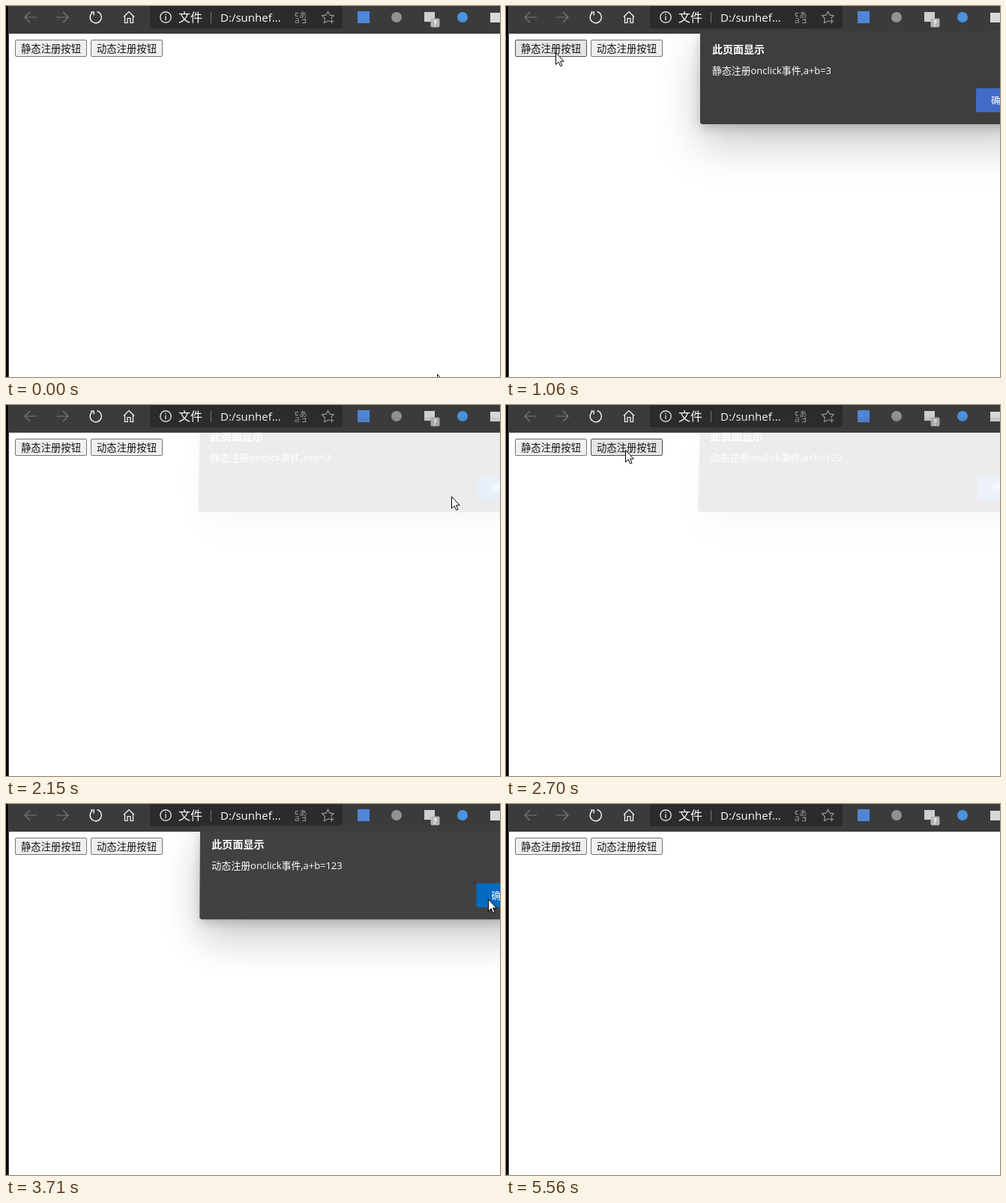
An HTML page for the animation above (5.72 s loop, 659 px wide and 496 px high).

```html
<!DOCTYPE html>
<html lang="zh">
<head>
<meta charset="utf-8">
<title>onclick</title>
<style>
  html, body { margin: 0; width: 100%; height: 100%; overflow: hidden; background: #fff; }
  svg { display: block; width: 659px; height: 496px; }
  text { font-family: "Open Sans", "Noto Sans CJK SC", "Noto Sans CJK", sans-serif; white-space: pre; }
  .line { fill: none; stroke-width: 1.2; }
  .page text { font-size: 13.333px; fill: #111; }
</style>
</head>
<body>
<svg viewBox="0 0 659 496">
  <defs>
    <filter id="wide" filterUnits="userSpaceOnUse" x="150" y="-80" width="670" height="400"><feGaussianBlur stdDeviation="28"/></filter>
    <filter id="tight" filterUnits="userSpaceOnUse" x="150" y="-80" width="670" height="400"><feGaussianBlur stdDeviation="7"/></filter>
    <clipPath id="below"><rect x="4" y="37" width="655" height="459"/></clipPath>
  </defs>

  <rect width="659" height="496" fill="#fff"/>
  <rect width="659" height="37" fill="#3b3b3b"/>
  <path d="M192 0H449V26a4 4 0 0 1-4 4H196a4 4 0 0 1-4-4Z" fill="#2b2b2b"/>

  <!-- navigation -->
  <g class="line" stroke="#7b7b7b">
    <path d="M41 15H25M32 8L25 15L32 22"/>
    <path d="M67 15H83M76 8L83 15L76 22"/>
  </g>
  <g class="line" stroke="#fff">
    <path d="M115 9.2A7.6 7.6 0 1 0 121.5 7.7M113 8.2H117.2V12.4" stroke-width="1.3"/>
    <path d="M157 14.5L164 7.5L171 14.5M158.500 13.500V22.500H162V16.500H166V22.500H169.500V13.500"/>
    <circle cx="213" cy="15" r="7.2"/>
    <path d="M213 13.500V19M213 10.500V12"/>
  </g>
  <text x="230" y="21" font-size="16" fill="#fff">文件</text>
  <path d="M273.500 8V23" stroke="#777"/>
  <text x="286" y="21" font-size="15" fill="#fff">D:/sunhef...</text>

  <!-- address bar tools -->
  <g fill="#969696">
    <text x="391" y="15.500" font-size="10.500">あ</text>
    <text x="385" y="23" font-size="12">a</text>
    <path class="line" d="M390 9.500H386.500V14M386 13.500H390M395 22.500H399.500V17M395 18.500H399" stroke="#969696"/>
  </g>
  <path class="line" d="M431 19.500L424.500 22.500L425.500 16.800L421.500 12.800L427 12.200L429.500 7.500L432 12.200L437 12.800L433.500 16.500M431 20.500H437.500M434.500 17.500V23.500" stroke="#999"/>

  <!-- extensions -->
  <rect x="469" y="7" width="16" height="16" fill="#4f86d8"/>
  <circle cx="521" cy="15" r="7" fill="#929292"/>
  <rect x="558" y="8" width="14" height="13" fill="#cfcfcf"/>
  <rect x="566.500" y="16.500" width="12" height="12" rx="2" fill="#b4b4b4"/>
  <text x="572.500" y="26.500" font-size="10" font-weight="700" fill="#fff" text-anchor="middle">?</text>
  <circle cx="609" cy="15" r="7" fill="#4b92df"/>
  <rect x="646" y="9" width="13" height="13" fill="#d8d8d8"/>

  <g class="page">
    <rect id="btnA" x="12.500" y="45.500" width="95" height="22" rx="1.500"/>
    <text x="20" y="62">静态注册按钮</text>
    <rect id="btnB" x="113.500" y="45.500" width="95" height="22" rx="1.500"/>
    <text x="121" y="62">动态注册按钮</text>
  </g>

  <g id="dialog">
    <g clip-path="url(#below)">
      <g id="shadow">
        <rect x="259" y="58" width="448" height="125" fill-opacity=".22" filter="url(#wide)"/>
        <rect x="259" y="38" width="448" height="125" fill-opacity=".18" filter="url(#tight)"/>
      </g>
    </g>
    <g id="panel">
      <path id="sheet" fill="#3e3e3e"/>
      <text x="275" y="63" font-size="14" font-weight="700" fill="#fff">此页面显示</text>
      <text id="message" x="275" y="91" font-size="12.900" fill="#fff"></text>
      <rect id="ok" x="627" y="110" width="64" height="32" rx="2"/>
      <text x="647" y="130.500" font-size="12.500" font-weight="500" fill="#fff">确定</text>
    </g>
  </g>

  <rect width="3" height="496" fill="#000"/>
  <rect x="3" width="1" height="496" fill="#4a4a4a"/>

  <path id="cursor" d="M.5 .5V16.300L4.200 12.900L6.700 18.500L9 17.500L6.600 12H11.300Z" fill="#fff" stroke="#000"/>
</svg>
<script>
const LOOP = 5720, TICK = 75;
const el = id => document.getElementById(id);
const set = (id, attrs) => { for (const k in attrs) el(id).setAttribute(k, attrs[k]); };
const within = (t, a, b) => t >= a && t < b;
const ticks = (t, start) => Math.floor((t - start) / TICK);
const ease = p => p * p * (3 - 2 * p);

const START = [575, 492];
const moves = [
  { at: 70, n: 5, to: [66, 62] },
  { at: 1140, n: 7, to: [645, 129] },
  { at: 2150, n: 5, to: [159, 60] },
  { at: 2775, n: 4, to: [645, 129] },
  { at: 3230, n: 2, to: [643, 127] },
  { at: 3790, n: 6, to: [577, 505] }
];

const alerts = [
  { open: 910, hover: 1590, press: 1830, close: 1990, text: '静态注册onclick事件,a+b=3' },
  { open: 2700, hover: 3000, press: 3540, close: 3710, text: '动态注册onclick事件,a+b=123' }
];

// Opacity and vertical shift for each tick of a transition.
const OPENING = [[.09, -16], [.6, -6], [1, 0]];
const CLOSING = [[.98, -4], [.5, -10], [.09, -16]];

function pointer(t) {
  let pos = START;
  for (const { at, n, to } of moves) {
    if (t < at) break;
    const p = ease(Math.min(1, (ticks(t, at) + 1) / n));
    pos = pos.map((v, i) => v + (to[i] - v) * p);
  }
  return pos.map(Math.round);
}

function dialogState(t, { open, close }) {
  if (t < open) return null;
  if (t < close) return OPENING[Math.min(2, ticks(t, open))];
  return CLOSING[ticks(t, close)] || null;
}

function drawButton(id, hover, press) {
  set(id, {
    fill: press ? '#f5f5f5' : hover ? '#e5e5e5' : '#efefef',
    stroke: press ? '#8d8d8d' : hover ? '#4f4f4f' : '#767676'
  });
}

// The dialog grows a little and tilts its top edge away as it lifts.
function drawDialog(t) {
  const box = alerts.find(a => dialogState(t, a));
  el('dialog').style.display = box ? '' : 'none';
  if (!box) return;
  const [opacity, dy] = dialogState(t, box);
  const tilt = -dy * 3 / 16;
  const grow = 1 - dy * .0008;
  set('dialog', { opacity });
  set('shadow', { transform: `translate(0 ${dy})` });
  set('panel', { transform: `translate(483 ${95 + dy}) scale(${grow}) translate(-483 -95)` });
  set('sheet', { d: `M${261 + tilt} 33H${705 - tilt}L${707 - tilt} 35L707 156L705 158H261L259 156L${259 + tilt} 35Z` });
  set('ok', { fill: t >= box.press ? '#0069bf' : t >= box.hover ? '#1a6cc2' : '#406bc6' });
  el('message').textContent = box.text;
}

function draw(t) {
  drawButton('btnA', within(t, 370, 1990), within(t, 450, 680));
  drawButton('btnB', within(t, 2450, 3710), within(t, 2540, 2620));
  drawDialog(t);
  set('cursor', { transform: `translate(${pointer(t)})` });
}

let begin;
function frame(now) {
  begin ??= now;
  draw((now - begin) % LOOP);
  requestAnimationFrame(frame);
}
draw(0);
requestAnimationFrame(frame);
</script>
</body>
</html>
```
